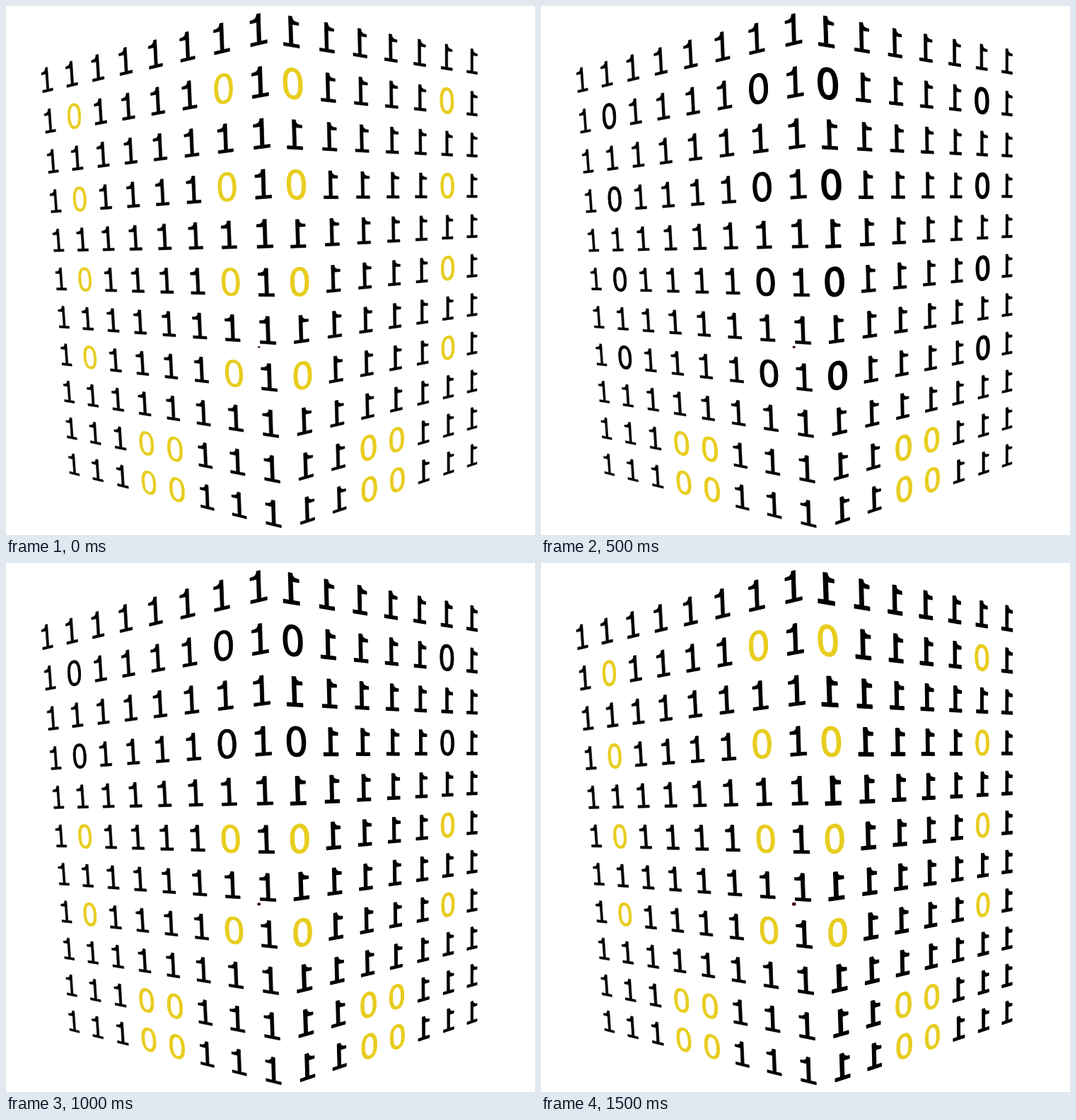
An HTML page that plays this animation: 748 px wide and 748 px high, repeating every 1750 ms.

```html
<!DOCTYPE html>
<html lang="en">
<head>
<meta charset="utf-8">
<title>Binary cube</title>
<style>
  html, body { margin: 0; width: 100%; height: 100%; overflow: hidden; background: #fff; }
  svg { display: block; width: 100vw; height: 100vh; }
  text { font: 100px Verdana, "DejaVu Sans", sans-serif; text-anchor: middle; }
  text, path { stroke-linejoin: round; }
</style>
</head>
<body>
<svg viewBox="0 0 748 748" role="img" aria-label="Cube of ones and zeros"></svg>
<script>
const NS = "http://www.w3.org/2000/svg";
const svg = document.querySelector("svg");
const BLACK = "#000", GOLD = "#e8cd20";
const ROWS = 11, STEP = 250, STEPS = 7;
const EM_COLS = 1.03, EM_ROWS = 0.8; // glyph em measured in grid cells

// A one with a low, flat flag, centred in a 100 unit em.
const ONE = "M-20.8 36.5V29H-4.1V-17.4H-20.8V-24C-10 -24.2 -4.5 -27 -4 -36.4H5.3V29H20.8V36.5Z";

// Corners are the centres of the corner digits, clockwise from top left.
const faces = [
  { cols: 8, flip: 1, pairs: [1, 6], block: [3, 4],
    corners: [[58, 104], [357, 33], [378, 717], [96, 648]],
    oneWeight: [1.2, 0.2, 0.8, 1, 1.2, 1.4, 1.6],
    zeroWeight: [0, 3.8, 2, 1.6, 1.2, 1, 0],
    goldWeight: [1, 2] },
  { cols: 7, flip: -1, pairs: [0, 5], block: [2, 3],
    corners: [[403, 36], [659, 78], [659, 635], [426, 712]],
    oneWeight: [1.2, 0.2, 1.6, 2.2, 2.8, 3.4, 4],
    zeroWeight: [0, 7, 4, 3, 2.5, 2, 0],
    goldWeight: [2, 3] }
];

function add(tag, attrs) {
  const node = document.createElementNS(NS, tag);
  for (const key in attrs) node.setAttribute(key, attrs[key]);
  return svg.appendChild(node);
}

// Perspective map of the unit square: position and both derivatives at (u, v).
function perspective([[x0, y0], [x1, y1], [x2, y2], [x3, y3]]) {
  const ax = x1 - x2, ay = y1 - y2, bx = x3 - x2, by = y3 - y2;
  const sx = x0 - x1 + x2 - x3, sy = y0 - y1 + y2 - y3;
  const det = ax * by - bx * ay;
  const g = (sx * by - bx * sy) / det, h = (ax * sy - sx * ay) / det;
  const axis = (p0, p1, p3) => [p1 - p0 + g * p1, p3 - p0 + h * p3, p0];
  const X = axis(x0, x1, x3), Y = axis(y0, y1, y3);
  return (u, v) => {
    const w = g * u + h * v + 1;
    const at = ([a, b, c]) => (a * u + b * v + c) / w;
    const x = at(X), y = at(Y);
    return {
      x, y,
      du: [(X[0] - g * x) / w, (Y[0] - g * y) / w],
      dv: [(X[1] - h * x) / w, (Y[1] - h * y) / w]
    };
  };
}

function addDigit(zero, transform) {
  if (!zero) return add("path", { d: ONE, transform });
  const node = add("text", { y: 36.5, transform });
  node.textContent = "0";
  return node;
}

const digits = [];
for (const face of faces) {
  const project = perspective(face.corners);
  const su = face.flip * EM_COLS / (face.cols - 1) / 100;
  const sv = EM_ROWS / (ROWS - 1) / 100;
  for (let row = 0; row < ROWS; row++) {
    const zeros = row >= 9 ? face.block : row % 2 ? face.pairs : [];
    for (let col = 0; col < face.cols; col++) {
      const { x, y, du, dv } = project(col / (face.cols - 1), row / (ROWS - 1));
      const m = [du[0] * su, du[1] * su, dv[0] * sv, dv[1] * sv, x, y];
      const zero = zeros.includes(col);
      const node = addDigit(zero, `matrix(${m.map(n => n.toFixed(5))})`);
      digits.push({ node, face, row, zero });
    }
  }
}
const speck = add("ellipse", { cx: 357.7, cy: 482.3, fill: "#3c0a14" });

function draw(step) {
  const firstLit = step ? 13 - 2 * step : 0;
  for (const { node, face, row, zero } of digits) {
    const lit = zero && row >= firstLit;
    const color = lit ? GOLD : BLACK;
    const weight = lit ? face.goldWeight[step ? 1 : 0]
      : (zero ? face.zeroWeight : face.oneWeight)[step];
    node.setAttribute("fill", color);
    node.setAttribute("stroke", color);
    node.setAttribute("stroke-width", weight);
  }
  speck.setAttribute("rx", 1.7 + step * 0.2);
  speck.setAttribute("ry", 1.3 + step * 0.2);
}

let shown = -1;
function tick() {
  const step = Math.floor(performance.now() / STEP) % STEPS;
  if (step !== shown) draw(shown = step);
  requestAnimationFrame(tick);
}
tick();
</script>
</body>
</html>
```
